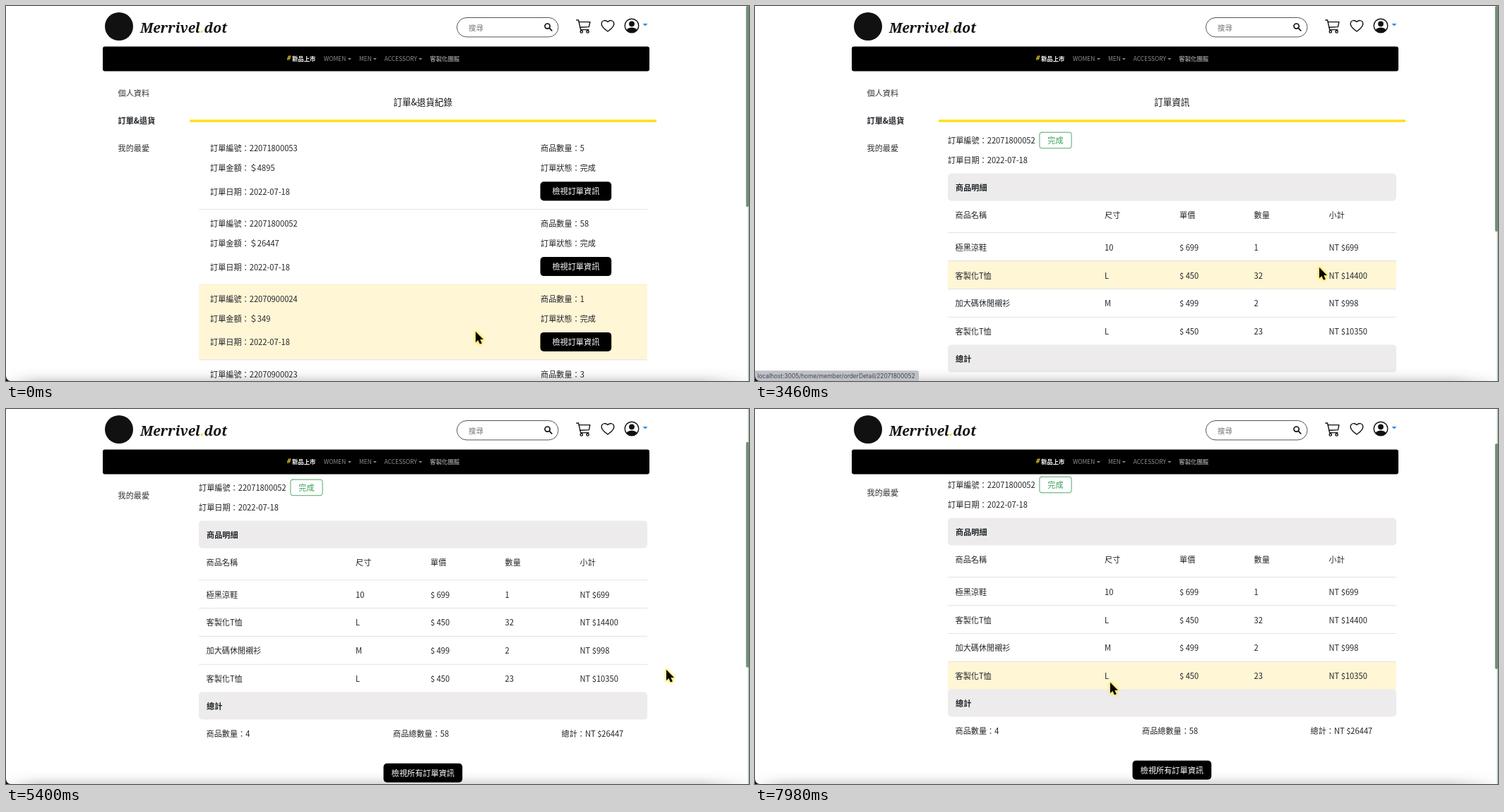
These frames come from a looping animation (1052x532 px, 8 s). An HTML page with a canvas:

```html
<!DOCTYPE html>
<html lang="zh-Hant">
<head>
<meta charset="utf-8">
<title>訂單紀錄</title>
<style>
  html, body { margin: 0; width: 100%; height: 100%; overflow: hidden; background: #fff; }
  canvas { display: block; width: 1052px; height: 532px; }
</style>
</head>
<body>
<canvas id="stage"></canvas>
<script>
const W = 1052, H = 532, LOOP = 8000;
const canvas = document.getElementById('stage');
const ctx = canvas.getContext('2d');
const dpr = window.devicePixelRatio || 1;
canvas.width = W * dpr;
canvas.height = H * dpr;

const CJK = '"Noto Sans CJK TC", "Noto Sans CJK", "Noto Sans", sans-serif';
const INK = '#212529', YELLOW = '#fbdf1c', HOVER = '#fff6d6', LINE = '#dee0e3';
const LEFT = 273, RIGHT = 908, SIZE = 11.15;
const SWAP = 3020;

// Key poses: time, then values
const cursorKeys = [
  [0, 665, 462], [20, 665, 462], [680, 677, 512], [1020, 677, 512],
  [1280, 673, 391], [1500, 678, 362], [1700, 678, 362], [2300, 799, 371],
  [3840, 799, 371], [4240, 935, 370], [5980, 935, 370], [6100, 762, 335.5],
  [6300, 590, 328], [6520, 560, 345], [6800, 599, 353], [6880, 597, 353],
  [7140, 597, 353], [7160, 596, 353], [7320, 596, 353], [7780, 504, 388.5],
  [7960, 504, 388.5], [7980, 503, 388]
];
const scrollKeys = [[3840, 0], [4240, 3], [4920, 3], [4940, 6], [5200, 64], [5540, 83]];
const statusKeys = [[2420, 0], [2540, 1], [3560, 1], [3760, 0]];

const orders = [
  ['22071800053', '4895', 5], ['22071800052', '26447', 58],
  ['22070900024', '349', 1], ['22070900023', '1497', 3]
];
const items = [
  ['極黑涼鞋', '10', '$ 699', '1', 'NT $699'],
  ['客製化T恤', 'L', '$ 450', '32', 'NT $14400'],
  ['加大碼休閒襯衫', 'M', '$ 499', '2', 'NT $998'],
  ['客製化T恤', 'L', '$ 450', '23', 'NT $10350']
];
const columns = [283.5, 495, 601, 706.5, 812.5];

// Monotone cubic interpolation of one value column
function sample(keys, t, c = 1) {
  const last = keys.length - 1;
  if (t <= keys[0][0]) return keys[0][c];
  if (t >= keys[last][0]) return keys[last][c];
  let i = 0;
  while (keys[i + 1][0] < t) i++;
  const slope = k => (keys[k + 1][c] - keys[k][c]) / (keys[k + 1][0] - keys[k][0]);
  const tangent = k => {
    if (k === 0 || k === last) return 0;
    const a = slope(k - 1), b = slope(k);
    return a * b <= 0 ? 0 : 2 * a * b / (a + b);
  };
  const h = keys[i + 1][0] - keys[i][0], u = (t - keys[i][0]) / h, v = 1 - u;
  return keys[i][c] * v * v * (1 + 2 * u) + keys[i + 1][c] * u * u * (3 - 2 * u)
    + h * u * v * (tangent(i) * v - tangent(i + 1) * u);
}

function text(str, x, y, { size = SIZE, weight = 400, color = INK, align = 'left', family = CJK, style = '' } = {}) {
  ctx.font = `${style} ${weight} ${size}px ${family}`;
  ctx.fillStyle = color;
  ctx.textAlign = align;
  ctx.fillText(str, x, y + size * 0.38);
}

function box(x, y, w, h, r, fill, stroke) {
  ctx.beginPath();
  ctx.roundRect(x, y, w, h, r);
  if (fill) { ctx.fillStyle = fill; ctx.fill(); }
  if (stroke) { ctx.strokeStyle = stroke; ctx.lineWidth = 1; ctx.stroke(); }
}

function rule(y) {
  ctx.fillStyle = LINE;
  ctx.fillRect(LEFT, y - 0.4, RIGHT - LEFT, 0.9);
}

function poly(points, fill) {
  ctx.beginPath();
  points.forEach(([x, y]) => ctx.lineTo(x, y));
  if (fill) { ctx.closePath(); ctx.fillStyle = fill; ctx.fill(); }
}

function dot(x, y, r, fill) {
  ctx.beginPath();
  ctx.arc(x, y, r, 0, Math.PI * 2);
  if (fill) { ctx.fillStyle = fill; ctx.fill(); } else ctx.stroke();
}

function caret(x, y, w, color) {
  poly([[x, y], [x + w, y], [x + w / 2, y + w / 2]], color);
}

function button(label, x, y, w, h) {
  box(x, y, w, h, 5, '#000');
  text(label, x + w / 2, y + h / 2 + 0.4, { weight: 500, color: '#fff', align: 'center' });
}

function band(label, y) {
  box(LEFT, y, RIGHT - LEFT, 39, 5, '#edebec');
  text(label, 284, y + 20.3, { weight: 700 });
}

function drawFrame(title) {
  text('個人資料', 158.5, 124, { color: '#333' });
  text('訂單&退貨', 158.5, 163, { weight: 700 });
  text('我的最愛', 158.5, 202, { color: '#333' });
  text(title, 590.3, 136.3, { size: 12.53, weight: 500, align: 'center', color: '#111' });
  box(260, 161.3, 661, 3.4, 1, YELLOW);
}

function hovered(mouse, top, pitch, count) {
  if (mouse.x < LEFT || mouse.x > RIGHT) return -1;
  const i = Math.floor((mouse.y - top) / pitch);
  return i < count ? i : -1;
}

function drawList(mouse) {
  const top = 181.5, pitch = 106.8;
  const active = hovered(mouse, top, pitch, orders.length);
  drawFrame('訂單&退貨紀錄');
  orders.forEach(([id, sum, count], i) => {
    const y = top + i * pitch;
    if (i === active) box(LEFT, y, RIGHT - LEFT, pitch, 4, HOVER);
    rule(y + pitch);
    text('訂單編號：' + id, 289, y + 20.5);
    text('訂單金額：＄' + sum, 289, y + 48.5);
    text('訂單日期：2022-07-18', 289, y + 82);
    text('商品數量：' + count, 757, y + 20.5);
    text('訂單狀態：完成', 757, y + 48.5);
    button('檢視訂單資訊', 756.5, y + 67.8, 100.7, 27);
  });
}

function drawDetail(mouse, scroll) {
  const top = 321.6, pitch = 39.9;
  const active = hovered(mouse, top - scroll, pitch, items.length);
  ctx.save();
  ctx.translate(0, -scroll);
  drawFrame('訂單資訊');
  text('訂單編號：22071800052', LEFT, 191);
  box(402.9, 179.2, 45.2, 22.6, 3, null, '#4fa868');
  text('完成', 425.5, 190.8, { color: '#37a057', align: 'center' });
  text('訂單日期：2022-07-18', LEFT, 219);
  band('商品明細', 237.5);
  ['商品名稱', '尺寸', '單價', '數量', '小計'].forEach((s, c) => text(s, columns[c], 297));
  items.forEach((item, i) => {
    const y = top + i * pitch;
    if (i === active) box(LEFT, y, RIGHT - LEFT, pitch, 2, HOVER);
    rule(y);
    item.forEach((s, c) => text(s, columns[c], y + 20.8, { weight: c ? 400 : 500 }));
  });
  band('總計', 480.6);
  text('商品數量：4', 283.5, 540);
  text('商品總數量：58', 548, 540);
  text('總計：NT $26447', 786.5, 540);
  button('檢視所有訂單資訊', 534.5, 581.8, 111.7, 27);
  ctx.restore();
}

function drawIcons() {
  ctx.strokeStyle = '#111';
  ctx.lineCap = ctx.lineJoin = 'round';
  ctx.lineWidth = 1.7;
  dot(766.6, 28.6, 3.6);
  poly([[769.4, 31.4], [772.8, 34.8]]);
  ctx.stroke();

  ctx.lineWidth = 1.4;
  poly([[807.8, 20], [810.6, 20], [813.6, 33.6], [825, 33.6]]);
  ctx.stroke();
  poly([[811.2, 22.6], [826.9, 22.6], [825.4, 29.6], [813, 30.3]]);
  ctx.stroke();
  dot(814.8, 36.4, 1.7);
  dot(823.6, 36.4, 1.7);

  ctx.beginPath();
  ctx.moveTo(852, 36);
  ctx.bezierCurveTo(836, 25.5, 845.5, 16.5, 852, 22.5);
  ctx.bezierCurveTo(858.5, 16.5, 868, 25.5, 852, 36);
  ctx.stroke();

  dot(886, 28, 9.8);
  dot(886, 25.3, 3.9, '#111');
  ctx.save();
  ctx.beginPath();
  ctx.arc(886, 28, 9.8, 0, Math.PI * 2);
  ctx.clip();
  ctx.beginPath();
  ctx.ellipse(886, 36.6, 8.4, 6, 0, 0, Math.PI * 2);
  ctx.fillStyle = '#111';
  ctx.fill();
  ctx.restore();
  caret(901.5, 25, 7, '#2f8be6');
}

function drawHeader() {
  ctx.fillStyle = '#fff';
  ctx.fillRect(0, 0, 1046, 92);
  dot(160, 29, 20, '#111');
  const brand = { size: 19.2, weight: 700, style: 'italic', family: '"Noto Serif", serif', color: '#111' };
  text('Merrivel', 190, 30.5, brand);
  let x = 190 + ctx.measureText('Merrivel').width;
  text('.', x, 30.5, { ...brand, color: YELLOW });
  x += ctx.measureText('.').width;
  text('dot', x, 30.5, brand);

  box(638.4, 16.5, 143.6, 27.4, 13.7, '#fff', '#555');
  text('搜尋', 655, 30.8, { size: 10.45, color: '#757575' });
  drawIcons();

  box(137, 57.5, 774, 35, 3, '#000');
  const nav = { size: 8.4, color: '#8e8e8e' };
  text('#', 397, 73, { size: 9.5, weight: 700, style: 'italic', color: YELLOW });
  text('新品上市', 405, 75.3, { size: 8.4, weight: 700, color: '#fff' });
  text('WOMEN', 450, 75.3, nav);
  text('MEN', 500, 75.3, nav);
  text('ACCESSORY', 535.8, 75.3, nav);
  text('客製化團服', 600.3, 75.3, { ...nav, weight: 700 });
  [484, 519.8, 584.3].forEach(cx => caret(cx, 74, 5, '#8e8e8e'));
}

function drawEdges(detail, scroll) {
  const shade = ctx.createLinearGradient(0, 513, 0, H);
  shade.addColorStop(0, 'rgba(0,0,0,0)');
  shade.addColorStop(0.5, 'rgba(0,0,0,.035)');
  shade.addColorStop(1, 'rgba(0,0,0,.15)');
  ctx.fillStyle = shade;
  ctx.fillRect(0, 513, W, 19);
  // Soften the shade towards both sides
  [[0, 45], [W, 985]].forEach(([from, to]) => {
    const fade = ctx.createLinearGradient(from, 0, to, 0);
    fade.addColorStop(0, 'rgba(255,255,255,.9)');
    fade.addColorStop(1, 'rgba(255,255,255,0)');
    ctx.fillStyle = fade;
    ctx.fillRect(Math.min(from, to), 513, Math.abs(to - from), 19);
  });
  ctx.fillStyle = '#a9c5ae';
  ctx.fillRect(1050.6, 0, 1.4, H);
  box(1047.8, scroll * 0.59, 4.2, detail ? 320 : 285, 2, '#708f78');
}

function drawStatus(alpha) {
  if (alpha <= 0) return;
  ctx.globalAlpha = alpha;
  box(0, 517.3, 232, 16, [0, 3, 0, 0], '#bfc1c8');
  text('localhost:3005/home/member/orderDetail/22071800052', 3.5, 525,
    { size: 8.35, color: '#42454c', family: 'Inter, "Liberation Sans", sans-serif' });
  ctx.globalAlpha = 1;
}

function drawCorner() {
  ctx.beginPath();
  ctx.moveTo(0, 525);
  ctx.quadraticCurveTo(0.5, 531.5, 7, H);
  ctx.lineTo(0, H);
  ctx.fillStyle = '#111';
  ctx.fill();
}

function drawCursor({ x, y }) {
  ctx.save();
  ctx.translate(x, y);
  poly([[0, 0], [0, 15], [3.4, 11.9], [6, 17.6], [8.7, 16.4], [6.2, 10.9], [10.8, 10.9]]);
  ctx.closePath();
  ctx.shadowColor = '#f5dc30';
  ctx.shadowBlur = 4 * dpr;
  ctx.lineWidth = 1.8;
  ctx.strokeStyle = '#f6e26a';
  ctx.stroke();
  ctx.shadowBlur = 0;
  ctx.fillStyle = '#000';
  ctx.fill();
  ctx.restore();
}

function render(t) {
  const mouse = { x: sample(cursorKeys, t, 1), y: sample(cursorKeys, t, 2) };
  const scroll = sample(scrollKeys, t);
  const detail = t >= SWAP;
  ctx.setTransform(dpr, 0, 0, dpr, 0, 0);
  ctx.fillStyle = '#fff';
  ctx.fillRect(0, 0, W, H);
  if (detail) drawDetail(mouse, scroll); else drawList(mouse);
  drawHeader();
  drawEdges(detail, scroll);
  drawStatus(sample(statusKeys, t));
  drawCorner();
  drawCursor(mouse);
}

const start = performance.now();
function tick() {
  render((performance.now() - start) % LOOP);
  requestAnimationFrame(tick);
}
tick();
</script>
</body>
</html>
```
